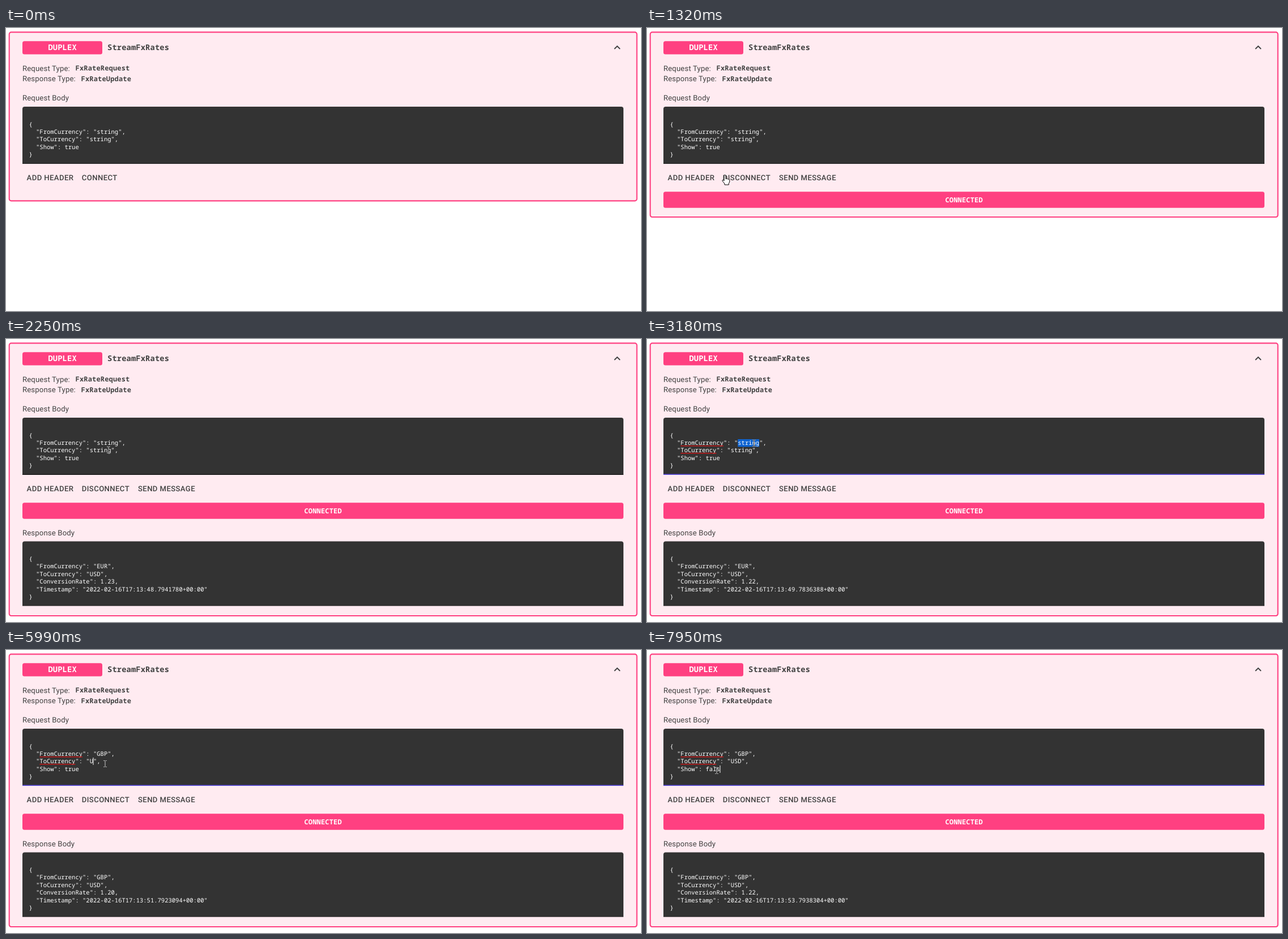
Recreate the animation shown at these times as an HTML page with a canvas. Size 1121 px wide and 500 px high, loop 8 s.

```html
<!DOCTYPE html>
<html lang="en">
<head>
<meta charset="utf-8">
<title>Duplex stream</title>
<style>
  html, body { margin: 0; width: 100%; height: 100%; overflow: hidden; background: #fff; }
  canvas { display: block; width: 1121px; height: 500px; }
</style>
</head>
<body>
<canvas id="stage"></canvas>
<script>
const W = 1121, H = 500, LOOP = 8000;
const PINK = '#ff4081', PALE = '#ffebf1', DARK = '#333333', INK = '#424242';
const SANS = 'Roboto, sans-serif', MONO = '"Noto Sans Mono", monospace';
const CODE_X = 40.4, CODE_SIZE = 10.52, CELL = 6.31, LEADING = 13.4;
const REQUEST_Y = 173.5, RESPONSE_Y = 392;

const canvas = document.getElementById('stage');
const ctx = canvas.getContext('2d');
const ratio = window.devicePixelRatio || 1;
canvas.width = W * ratio;
canvas.height = H * ratio;

// Value of the last entry whose start time has passed.
const latest = (t, entries) => entries.reduce((v, [start, value]) => t >= start ? value : v, undefined);
const between = (t, a, b) => t >= a && t < b;
const smooth = u => u * u * (3 - 2 * u);

const EDITS = {
  from: [[0, 'string'], [3810, 'G'], [4040, 'GB'], [4110, 'GBP']],
  to: [[0, 'string'], [5990, 'U'], [6070, 'US'], [6140, 'USD']],
  show: [[0, 'true'], [7560, 'f'], [7630, 'fa'], [7880, 'fal'], [7950, 'fals']]
};
// Line, first column, selected span, caret span
const FIELDS = [
  { key: 'from', line: 1, col: 19, select: [2880, 3810], caret: [3810, 4680] },
  { key: 'to', line: 2, col: 17, select: [5210, 5990], caret: [5990, 6710] },
  { key: 'show', line: 3, col: 10, select: [7180, 7560], caret: [7560, LOOP] }
];
const RESPONSES = [
  [2250, ['EUR', 'USD', '1.23', '48.7941780']],
  [3180, ['EUR', 'USD', '1.22', '49.7836388']],
  [4280, ['GBP', 'EUR', '1.19', '50.8034363']],
  [5280, ['GBP', 'USD', '1.20', '51.7923094']],
  [6310, ['GBP', 'EUR', '1.20', '52.8031275']],
  [7250, ['GBP', 'USD', '1.22', '53.7938304']]
];
const MOVES = [
  { start: 460, from: [765, 458], to: [137, 259.5], first: 0, steps: 8, gap: 78 },
  { start: 1870, from: [137, 259.5], to: [189, 184], first: 1, steps: 8, gap: 75.7 },
  { start: 4830, from: [189, 184], to: [175, 201], first: 1, steps: 2, gap: 80 },
  { start: 6710, from: [175, 201], to: [123, 213], first: 1, steps: 4, gap: 73 }
];
const CLICKS = [[1162, 1240], [2800, 2950], [5060, 5210], [7100, 7250]];

function box(x, y, w, h, color, radii = 0) {
  ctx.fillStyle = color;
  ctx.beginPath();
  ctx.roundRect(x, y, w, h, radii);
  ctx.fill();
}

function text(str, x, y, font, { color = INK, spacing = 0, align = 'left' } = {}) {
  ctx.font = font;
  ctx.letterSpacing = spacing + 'px';
  ctx.textAlign = align;
  ctx.fillStyle = color;
  ctx.fillText(str, x, y);
}

const label = (str, y) => text(str, 29, y, `13.16px ${SANS}`, { spacing: 0.14 });
const button = (str, x) => text(str, x, 268.7, `500 13.16px ${SANS}`, { spacing: 0.376 });
const strong = (str, x, y, size, options) =>
  text(str, x, y, `bold ${size}px ${MONO}`, { spacing: 0.14, ...options });

function code(lines, top) {
  lines.forEach((line, i) =>
    text(line, CODE_X, Math.round(top + i * LEADING), `${CODE_SIZE}px ${MONO}`, { color: '#fff' }));
}

const colX = col => CODE_X + col * CELL;
const lineY = line => Math.round(REQUEST_Y + line * LEADING);

function pointer(t) {
  const move = latest(t, MOVES.map(m => [m.start, m]));
  if (!move) return null;
  const step = Math.floor((t - move.start) / move.gap) + move.first;
  const u = smooth(Math.min(1, step / move.steps));
  const [x, y] = move.from.map((a, i) => a + (move.to[i] - a) * u);
  const inside = x > 29 && x < 1090 && y > 139 && y < 240;
  const onButton = x > 126 && x < 226 && y > 247 && y < 281;
  return { x, y, kind: inside ? 'text' : onButton ? 'hand' : 'arrow' };
}

function outlined(path) {
  const shape = new Path2D(path);
  ctx.fillStyle = '#fff';
  ctx.strokeStyle = '#000';
  ctx.lineWidth = 1;
  ctx.lineJoin = 'round';
  ctx.fill(shape);
  ctx.stroke(shape);
}

function drawPointer({ x, y, kind }, clicking) {
  if (clicking) {
    ctx.fillStyle = 'rgba(235,220,0,.55)';
    ctx.beginPath();
    ctx.arc(x - (kind === 'text' ? 1 : 0), y, 11.2, 0, 2 * Math.PI);
    ctx.fill();
  }
  ctx.save();
  ctx.translate(x, y);
  if (kind === 'arrow') {
    outlined('M0 0V15.5L3.6 12.2L6 17.8L8.4 16.8L6 11.3H11Z');
  } else if (kind === 'hand') {
    outlined('M-1 1Q0.5 -.8 2 1V7Q3.5 5.8 4.5 7.3Q6 6.3 6.8 8Q8.5 7.3 8.8 9V12.5L7.3 15V17.5H0V15.5' +
      'L-4 10.6Q-4.2 8.6 -2.4 9L-1 10.5Z');
  } else {
    ctx.globalCompositeOperation = 'difference';
    ctx.strokeStyle = '#fff';
    ctx.lineWidth = 1;
    ctx.stroke(new Path2D('M-2.8 -5.5H-.8L0 -4.7L.8 -5.5H2.8M0 -4.7V4.7M-2.8 5.5H-.8L0 4.7L.8 5.5H2.8'));
  }
  ctx.restore();
}

function drawCard(bottom) {
  ctx.beginPath();
  ctx.roundRect(5.7, 7.4, 1108, bottom - 8.4, 3.5);
  ctx.fillStyle = PALE;
  ctx.fill();
  ctx.strokeStyle = PINK;
  ctx.lineWidth = 2.1;
  ctx.stroke();

  box(29, 23.2, 141, 23.4, PINK, 3.5);
  strong('DUPLEX', 99.6, 39.3, 13.75, { color: '#fff', align: 'center' });
  strong('StreamFxRates', 179, 39.2, 13.75);

  ctx.fillStyle = INK;
  ctx.fill(new Path2D('M1079 30.7L1073.4 36.3L1074.7 37.7L1079 33.4L1083.3 37.7L1084.6 36.3Z'));

  label('Request Type:', 75.6);
  strong('FxRateRequest', 122.6, 75.2, 12.06);
  label('Response Type:', 94.4);
  strong('FxRateUpdate', 132.6, 94, 12.06);
  label('Request Body', 128.3);
}

function drawRequest(t, hover) {
  box(29, 139, 1061, 101, DARK, [4, 4, 0, 0]);
  box(29, 239, 1061, 1, hover ? '#000' : 'rgba(0,0,0,.42)');
  if (t >= 2800) {
    const width = 1061 * smooth(Math.min(1, (t - 2800) / 200));
    box(559.5 - width / 2, 238.5, width, 1.5, '#594ae2');
  }

  const value = {};
  for (const key in EDITS) value[key] = latest(t, EDITS[key]);

  for (const f of FIELDS) {
    if (between(t, ...f.select))
      box(colX(f.col), lineY(f.line) - 10, value[f.key].length * CELL, 13.4, '#0d63d1');
  }
  code(['{', `  "FromCurrency": "${value.from}",`, `  "ToCurrency": "${value.to}",`,
    `  "Show": ${value.show}`, '}'], REQUEST_Y);

  if (t >= 3030) {
    box(colX(3), lineY(1) + 1.2, 12 * CELL, 1.3, '#e01414');
    box(colX(3), lineY(2) + 1.2, 10 * CELL, 1.3, '#e01414');
  }
  for (const f of FIELDS) {
    if (between(t, ...f.caret))
      box(Math.round(colX(f.col + value[f.key].length)) - 0.5, lineY(f.line) - 10, 1, 13, '#fff');
  }
}

function drawResponse([from, to, rate, seconds]) {
  label('Response Body', 346.8);
  box(29, 357.5, 1061, 114, DARK, [4, 4, 0, 0]);
  box(29, 470.5, 1061, 1, 'rgba(0,0,0,.42)');
  code(['{', `  "FromCurrency": "${from}",`, `  "ToCurrency": "${to}",`, `  "ConversionRate": ${rate},`,
    `  "Timestamp": "2022-02-16T17:13:${seconds}+00:00"`, '}'], RESPONSE_Y);
}

function draw(t) {
  const connected = t >= 1320;
  const response = latest(t, RESPONSES);
  const cursor = pointer(t);

  ctx.setTransform(ratio, 0, 0, ratio, 0, 0);
  ctx.textRendering = 'geometricPrecision';
  box(0, 0, W, H, '#fff');
  drawCard(response ? 490 : connected ? 335 : 306.4);
  drawRequest(t, cursor && cursor.kind === 'text');

  button('ADD HEADER', 36.6);
  button(connected ? 'DISCONNECT' : 'CONNECT', 133.8);
  if (connected) {
    button('SEND MESSAGE', 233);
    box(29, 289.2, 1061, 28.6, PINK, 3.5);
    strong('CONNECTED', 559.6, 307.8, 12.06, { color: '#fff', align: 'center' });
  }
  if (response) drawResponse(response);
  if (cursor) drawPointer(cursor, CLICKS.some(span => between(t, ...span)));
}

const began = performance.now();
function tick() {
  draw((performance.now() - began) % LOOP);
  requestAnimationFrame(tick);
}
tick();
</script>
</body>
</html>
```
